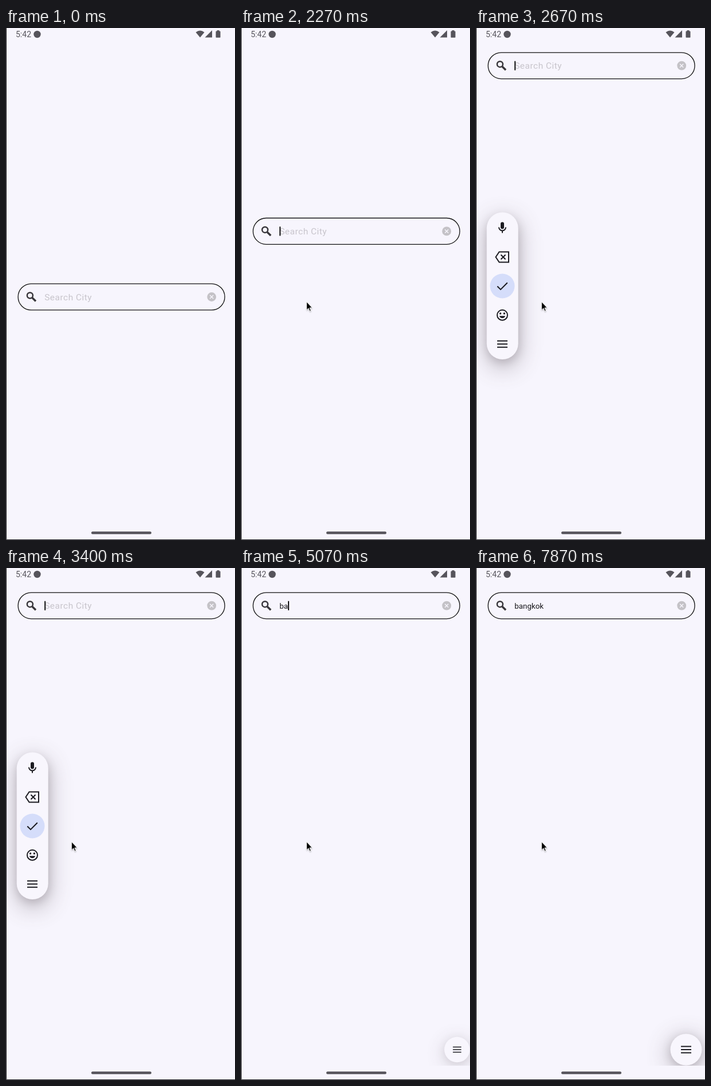
Animation, 400 px wide and 893 px high, one loop 8000 ms. Source, as an HTML page:

```html
<!DOCTYPE html>
<html lang="en">
<head>
<meta charset="utf-8">
<title>City search</title>
<style>
  html, body { margin: 0; width: 100%; height: 100%; overflow: hidden; background: #f7f5fd; }
  svg { display: block; width: 400px; height: 893px; }
  text { font-family: Roboto, sans-serif; white-space: pre; }
  .shade { fill: #4a3f48; }
  .wide { filter: blur(20px); opacity: .3; }
  .near { filter: blur(8px); opacity: .2; }
  .line { fill: none; stroke: #1b1b20; stroke-width: 2; }
</style>
</head>
<body>
<svg viewBox="0 0 400 893">
  <defs>
    <clipPath id="app"><rect width="400" height="868"/></clipPath>
    <path id="menu" class="line" d="M-9-5.5H9M-9 0H9M-9 5.5H9"/>
  </defs>
  <rect width="400" height="893" fill="#f7f5fd"/>

  <g fill="#56545b">
    <text x="17" y="15.5" font-size="14">5:42</text>
    <circle cx="54.5" cy="11" r="6.2"/>
    <path d="M331.5 7.6Q339 1.2 346.5 7.6L339 16.6Z"/>
    <path d="M360 4V16.6H347.5Z"/>
    <path d="M368.5 4h4v1.4h1.2q.8 0 .8.8v9.8q0 .8-.8.8h-6.400q-.8 0-.8-.8V6.200q0-.8.8-.8h1.200z"/>
    <rect x="149" y="878.300" width="105" height="4.400" rx="2.200"/>
  </g>

  <g id="bar">
    <rect x="21.100" y="-22.900" width="361" height="45.800" rx="22.900" fill="none" stroke="#111" stroke-width="1.300"/>
    <g fill="none" stroke="#38363b">
      <circle cx="41.900" cy="-2.500" r="5" stroke-width="2.500"/>
      <path d="M45.800 1.600L52 7.500" stroke-width="3.400"/>
    </g>
    <text id="hint" x="67.200" y="5.500" font-size="15.500" letter-spacing=".48" fill="#c8c5cc">Search City</text>
    <text id="typed" x="67.200" y="5" font-size="13.400" fill="#17161a"></text>
    <rect id="caret" y="-8" width="2" height="16" fill="#111"/>
    <circle cx="359.200" cy="0" r="7.900" fill="#c4c2c7"/>
    <path d="M356.200-3l6 6m0-6l-6 6" stroke="#f7f5fd" stroke-width="1.500"/>
  </g>

  <g clip-path="url(#app)">
    <g id="tools">
      <g class="shades">
        <rect class="shade wide" x="17" y="330" width="60" height="264" rx="30"/>
        <rect class="shade near" x="19" y="328" width="56" height="256" rx="28"/>
      </g>
      <rect x="18.700" y="321.500" width="55" height="256.500" rx="27.500" fill="#f8f6fd"/>
      <g transform="translate(46 348)">
        <rect x="-3" y="-9.500" width="6" height="12" rx="3" fill="#1b1b20"/>
        <path class="line" d="M-6-.5a6 6 0 0 0 12 0M0 5.500V9.500"/>
      </g>
      <g transform="translate(46 399.500)">
        <path class="line" d="M-5.500-9H11V9H-5.500L-11.500 0ZM-2.500-4l8 8m0-8l-8 8"/>
      </g>
      <circle cx="46" cy="450" r="21.500" fill="#d5ddfa"/>
      <path class="line" d="M37.300 450.500l5.700 5.700L54.800 444.300"/>
      <g transform="translate(46 500.700)">
        <circle class="line" r="9"/>
        <circle cx="-3.400" cy="-2.800" r="1.600"/>
        <circle cx="3.400" cy="-2.800" r="1.600"/>
        <path d="M-5.200 1.500H5.200A5.500 5.500 0 0 1-5.200 1.500Z" fill="#1b1b20"/>
      </g>
      <use href="#menu" x="46" y="551.300"/>
    </g>
    <g id="fab">
      <g class="shades">
        <circle class="shade wide" cy="8" r="32"/>
        <circle class="shade near" cy="4" r="28"/>
      </g>
      <circle r="27.500" fill="#f8f6fd"/>
      <use href="#menu"/>
    </g>
  </g>

  <path d="M.5 0V892.500H400" fill="none" stroke="#1c1b20"/>
  <g id="pointer">
    <path d="M0 0V15.300L3.500 12.200L5.800 17.300L8.300 16.200L6 11.200H10.500Z" fill="#000" opacity=".25" transform="translate(.3 1.500)" style="filter:blur(1px)"/>
    <path d="M.3 .3V14.500L3.600 11.500L5.800 16.600L7.900 15.700L5.700 10.700H10Z" fill="#000" stroke="#fff" stroke-width=".9"/>
  </g>
</svg>
<script>
const LOOP = 8000, FPS = 15;
const $ = id => document.getElementById(id);
const [bar, hint, typed, caret, tools, fab, pointer] =
  ['bar', 'hint', 'typed', 'caret', 'tools', 'fab', 'pointer'].map($);

// time of focus, then of each key, with the length typed
const WORD = 'bangkok';
const keys = [[2220, 0], [4600, 1], [4860, 2], [5200, 3], [5400, 4], [5660, 5], [6060, 6], [6330, 7]];

const part = (t, from, ms) => Math.min(1, Math.max(0, (t - from) / ms));
const mix = (a, b, p) => a + (b - a) * p;
const out = p => 1 - (1 - p) ** 3;
const show = (el, on) => { el.style.display = on ? '' : 'none'; };
const place = (el, x, y, s = 1) => el.setAttribute('transform', `translate(${x} ${y}) scale(${s})`);
const shade = (el, a) => { el.querySelector('.shades').style.opacity = a; };

// cubic-bezier(.4, 0, .2, 1)
function standard(x) {
  let lo = 0, hi = 1;
  for (let i = 0; i < 20; i++) {
    const u = (lo + hi) / 2, v = 1 - u;
    if (1.2 * u * v * v + .6 * u * u * v + u ** 3 < x) lo = u; else hi = u;
  }
  return 3 * lo * lo - 2 * lo ** 3;
}

function drawBar(t) {
  place(bar, 0, mix(469, 65.700, standard(part(t, 2190, 285))));
  const key = keys.filter(k => k[0] <= t).pop();
  const text = key ? WORD.slice(0, key[1]) : '';
  if (typed.textContent !== text) typed.textContent = text;
  show(hint, !text);
  show(caret, key && Math.floor(Math.max(0, t - key[0] - 20) / 500) % 2 === 0);
  caret.setAttribute('x', 67.200 + (text ? typed.getComputedTextLength() : 0));
}

function drawTools(t) {
  const enter = out(part(t, 2440, 200));
  const leave = part(t, 4600, 200) ** 1.750;
  const s = mix(.6, 1, enter) * mix(1, .9, leave);
  const x = 46 - 22 * (1 - enter) - 75 * leave;
  const pivot = mix(450, 360, part(t, 4000, 1));
  show(tools, t > 2440 && leave < 1);
  place(tools, x - 46 * s, pivot * (1 - s), s);
  shade(tools, enter * (1 - leave));
}

function drawFab(t) {
  const p = standard(part(t, 4950, 300));
  const grow = part(t, 4950, 234);
  const q = mix(grow, p, .3);
  show(fab, t > 4950);
  place(fab, mix(389, 367, q), 840, mix(.6, 1, q));
  shade(fab, q);
}

function drawPointer(t) {
  const p = out(part(t, 600, 600));
  show(pointer, t >= 599);
  place(pointer, mix(335, 114.300, p), mix(666, 477.300, p));
}

const start = performance.now();
function tick() {
  const now = (performance.now() - start) % LOOP;
  const t = Math.floor((now + 1) * FPS / 1000) * 1000 / FPS;
  drawBar(t);
  drawTools(t);
  drawFab(t);
  drawPointer(t);
  requestAnimationFrame(tick);
}
tick();
</script>
</body>
</html>
```
